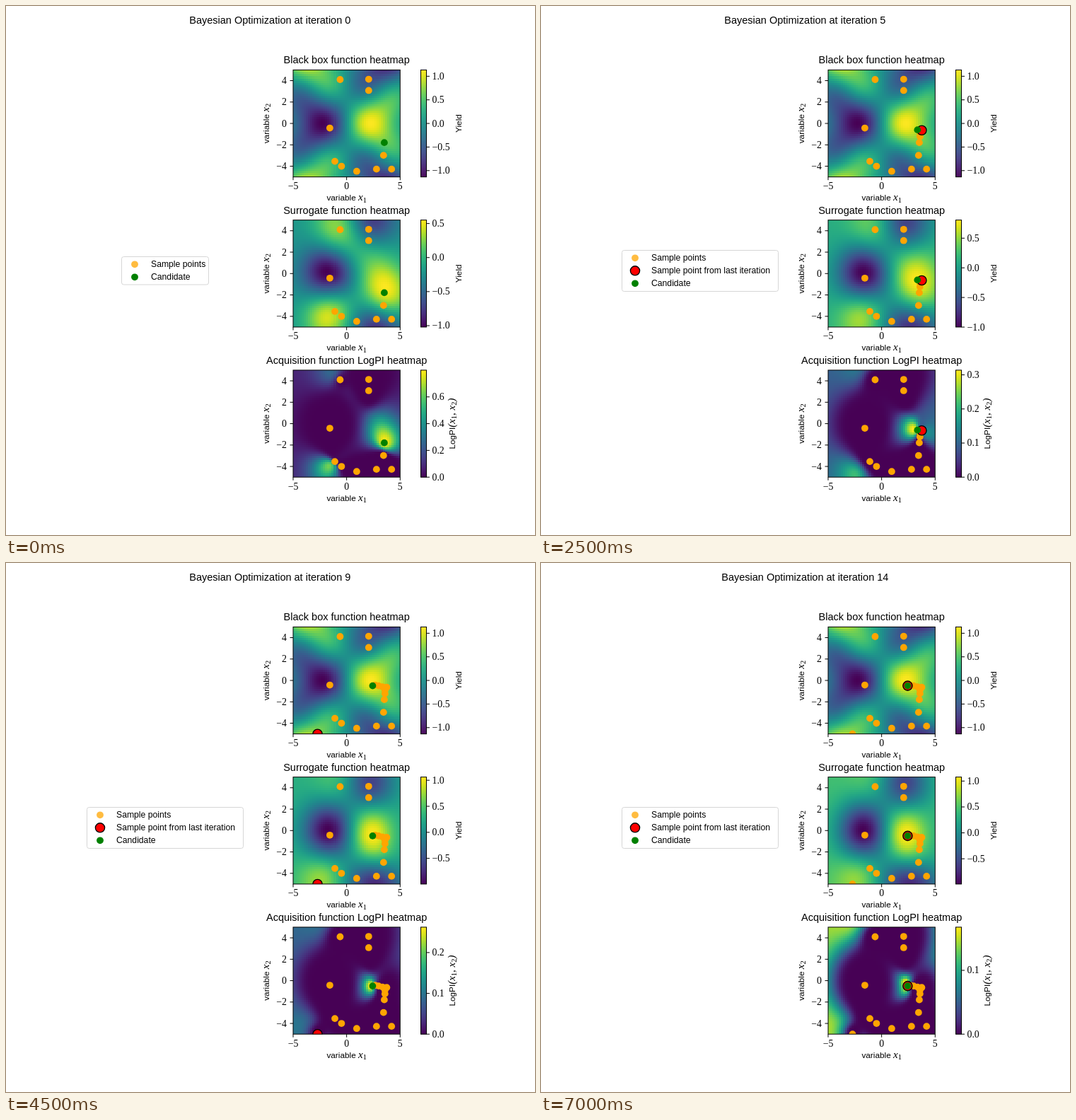
Animation of 748x748 px, one loop 7.5 s. Source, as an HTML page with a canvas:

```html
<!DOCTYPE html>
<html lang="en">
<head>
<meta charset="utf-8">
<title>Bayesian Optimization</title>
<style>
  html, body { margin: 0; width: 100%; height: 100%; overflow: hidden; background: #fff; }
  canvas { display: block; }
</style>
</head>
<body>
<canvas id="stage" width="748" height="748"></canvas>
<script>
const ctx = document.getElementById('stage').getContext('2d');
const STEP = 500, COUNT = 15, GRID = 50;
const LEFT = 406, SIDE = 151.3, TOP = 90.4, PITCH = 212.25;
const SANS = '"Liberation Sans", Arial, sans-serif';
const SERIF = '"Liberation Serif", "Times New Roman", serif';
const label = `11.8px ${SANS}`, legendFont = `12.2px ${SANS}`, title = `14.5px ${SANS}`;
const digits = `13.8px ${SERIF}`, math = `italic 15px ${SERIF}`, sub = `10.5px ${SERIF}`;

const initial = [[-.61, 4.1], [2.06, 4.13], [2.06, 3.08], [-1.57, -.43], [-1.1, -3.54],
  [-.48, -4], [.94, -4.47], [2.79, -4.27], [4.2, -4.27], [3.45, -2.98]];
const candidates = [[3.52, -1.79], [3.58, -1.23], [3.58, -.89], [3.58, -.66], [3.75, -.64],
  [3.35, -.6], [2.99, -.5], [2.66, -.43], [-2.72, -5], [2.43, -.5]];
const candidate = n => candidates[Math.min(n, candidates.length - 1)];
const samples = n => [...initial, ...Array.from({ length: n }, (_, i) => candidate(i))];

const blackBox = ([x, y]) =>
  Math.sin(x / 2) * Math.cos(y / 2) + .3 * Math.sin(x) * Math.cos(y);

// Gaussian process regression with a squared exponential kernel
const SCALE_X = 1.75, SCALE_Y = 2.2, NOISE = .01, MARGIN = .04;
const kernel = ([x, y], [u, v]) =>
  Math.exp(-(((x - u) / SCALE_X) ** 2 + ((y - v) / SCALE_Y) ** 2) / 2);
const dotProduct = (a, b) => a.reduce((sum, v, i) => sum + v * b[i], 0);
const average = a => a.reduce((sum, v) => sum + v, 0) / a.length;
const normalCdf = z => 1 / (1 + Math.exp(-1.5976 * z - .07056 * z ** 3));

function solveLower(rows, b) {
  const out = [];
  rows.forEach((row, i) => {
    let v = b[i];
    for (let j = 0; j < i; j++) v -= row[j] * out[j];
    out.push(v / row[i]);
  });
  return out;
}

function cholesky(points) {
  const rows = [];
  points.forEach((p, i) => {
    const row = solveLower(rows, points.slice(0, i).map(q => kernel(p, q)));
    rows.push([...row, Math.sqrt(1 + NOISE - dotProduct(row, row))]);
  });
  return rows;
}

function model(n) {
  const points = samples(n), seen = points.map(blackBox);
  const mean = average(seen), best = Math.max(...seen) + MARGIN;
  const spread = Math.sqrt(average(seen.map(v => (v - mean) ** 2)));
  const rows = cholesky(points), weights = solveLower(rows, seen.map(v => v - mean));
  const surrogate = [], score = [];
  for (const cell of cells) {
    const k = solveLower(rows, points.map(p => kernel(cell, p)));
    const mu = mean + dotProduct(k, weights);
    const sigma = spread * Math.sqrt(Math.max(1e-6, 1 - dotProduct(k, k)));
    surrogate.push(mu);
    score.push(normalCdf((mu - best) / sigma));
  }
  return { surrogate, score };
}

const cells = Array.from({ length: GRID * GRID }, (_, i) =>
  [-5 + 10 * (i % GRID) / (GRID - 1), 5 - 10 * Math.floor(i / GRID) / (GRID - 1)]);
const truth = cells.map(blackBox);

// Polynomial fit of the viridis colour map, one row per channel
const viridis = [
  [.27773, .10509, -.33086, -4.63423, 6.22827, 4.77638, -5.43546],
  [.00541, 1.40461, .21485, -5.7991, 14.17993, -13.74515, 4.64585],
  [.3341, 1.38459, .0951, -19.33244, 56.69055, -65.35303, 26.31244]];
const colour = t => viridis.map(c => Math.round(255 * c.reduceRight((sum, k) => sum * t + k, 0)));

const tile = document.createElement('canvas');
tile.width = tile.height = GRID;
const tileCtx = tile.getContext('2d');

function heatmap(values, top, lo, hi) {
  const image = tileCtx.createImageData(GRID, GRID);
  values.forEach((v, i) => image.data.set([...colour((v - lo) / (hi - lo)), 255], i * 4));
  tileCtx.putImageData(image, 0, 0);
  ctx.imageSmoothingEnabled = false;
  ctx.drawImage(tile, LEFT, top, SIDE, SIDE);
}

function text(s, x, y, font, align = 'left') {
  ctx.font = font;
  ctx.textAlign = align;
  ctx.fillStyle = '#000';
  ctx.fillText(s, x, y);
}

// Centred line of [string, font, drop] parts, optionally turned upwards
function rich(parts, x, y, turned) {
  const width = ([s, font]) => (ctx.font = font, ctx.measureText(s).width);
  ctx.save();
  ctx.translate(x, y);
  if (turned) ctx.rotate(-Math.PI / 2);
  let pos = -parts.reduce((sum, p) => sum + width(p), 0) / 2;
  for (const p of parts) {
    text(p[0], pos, p[2] || 0, p[1]);
    pos += width(p);
  }
  ctx.restore();
}
const variable = i => [['x', math], [i, sub, 2.5]];
const axisName = i => [['variable ', label], ...variable(i)];
const yieldName = [['Yield', label]];
const scoreName = [['LogPI', label], ['(', math], ...variable('1'), [', ', math],
  ...variable('2'), [')', math]];

function line(x1, y1, x2, y2) {
  ctx.beginPath();
  ctx.moveTo(x1, y1);
  ctx.lineTo(x2, y2);
  ctx.stroke();
}

function dot(x, y, fill, r = 4.9, outlined) {
  ctx.beginPath();
  ctx.arc(x, y, r, 0, 7);
  ctx.fillStyle = fill;
  ctx.fill();
  if (outlined) {
    ctx.lineWidth = 1.4;
    ctx.stroke();
    ctx.lineWidth = 1;
  }
}
const signed = (v, places) => (v < 0 ? '\u2212' : '') + Math.abs(v).toFixed(places);

function colourBar(top, lo, hi, step) {
  const x = 586.5, w = 8;
  for (let i = 0; i < SIDE; i++) {
    ctx.fillStyle = `rgb(${colour(1 - i / SIDE)})`;
    ctx.fillRect(x, top + i, w, Math.min(1.5, SIDE - i));
  }
  ctx.strokeRect(x, top, w, SIDE);
  for (let i = Math.ceil(lo / step - .01); i * step <= hi; i++) {
    const y = top + SIDE * (hi - i * step) / (hi - lo);
    line(x + w, y, x + w + 4.5, y);
    text(signed(i * step, 1), 602.5, y + 4.5, digits);
  }
}

function marks(n, top) {
  const unit = SIDE / 10;
  const put = ([x, y], ...style) => dot(LEFT + (x + 5) * unit, top + (5 - y) * unit, ...style);
  ctx.save();
  ctx.beginPath();
  ctx.rect(LEFT, top, SIDE, SIDE);
  ctx.clip();
  samples(n).forEach(p => put(p, '#ffa500'));
  if (n) put(candidate(n - 1), '#f00', 6.6, true);
  put(candidate(n), '#008000');
  ctx.restore();
}

function panel(n, i, name, values, unitName, unitX) {
  const top = TOP + PITCH * i, middle = LEFT + SIDE / 2, bottom = top + SIDE;
  const lo = Math.min(...values), hi = Math.max(...values), range = hi - lo;
  heatmap(values, top, lo, hi);
  marks(n, top);
  ctx.strokeRect(LEFT, top, SIDE, SIDE);
  for (let v = -4; v <= 4; v += 2) {
    const y = top + SIDE * (5 - v) / 10;
    line(LEFT - 4.5, y, LEFT, y);
    text(signed(v, 0), 397, y + 4.5, digits, 'right');
  }
  for (let v = -5; v <= 5; v += 5) {
    const x = LEFT + SIDE * (v + 5) / 10;
    line(x, bottom, x, bottom + 4.5);
    text(signed(v, 0), x, bottom + 17.5, digits, 'center');
  }
  text(name, middle, top - 9, title, 'center');
  rich(axisName('1'), middle, bottom + 33.3);
  rich(axisName('2'), 371.5, top + SIDE / 2, true);
  colourBar(top, lo, hi, range > 1 ? .5 : range > .5 ? .2 : .1);
  rich(unitName, unitX, top + SIDE / 2, true);
}

function legend(n) {
  const [x, y, w, h] = n ? [114.5, 345.5, 221, 58] : [163.5, 354.5, 123, 39.5];
  const rows = [['Sample points', 'rgba(255,165,0,.75)'], ['Candidate', '#008000']];
  if (n) rows.splice(1, 0, ['Sample point from last iteration', '#f00', 6.6, true]);
  ctx.beginPath();
  ctx.roundRect(x, y, w, h, 3);
  ctx.strokeStyle = '#d6d6d6';
  ctx.stroke();
  ctx.strokeStyle = '#000';
  rows.forEach(([name, ...style], i) => {
    dot(x + 18.5, y + 10.8 + 18 * i, ...style);
    text(name, x + 41.5, y + 14.2 + 18 * i, legendFont);
  });
}

function draw(n) {
  const { surrogate, score } = model(n);
  ctx.fillStyle = '#fff';
  ctx.fillRect(0, 0, 748, 748);
  ctx.lineWidth = 1;
  text('Bayesian Optimization at iteration ' + n, 373.3, 25, title, 'center');
  legend(n);
  panel(n, 0, 'Black box function heatmap', truth, yieldName, 643.5);
  panel(n, 1, 'Surrogate function heatmap', surrogate, yieldName, 643.5);
  panel(n, 2, 'Acquisition function LogPI heatmap', score, scoreName, 634.5);
}

let shown = -1;
const start = performance.now();
function tick() {
  const n = Math.floor((performance.now() - start) / STEP) % COUNT;
  if (n !== shown) draw(shown = n);
  requestAnimationFrame(tick);
}
tick();
</script>
</body>
</html>
```
